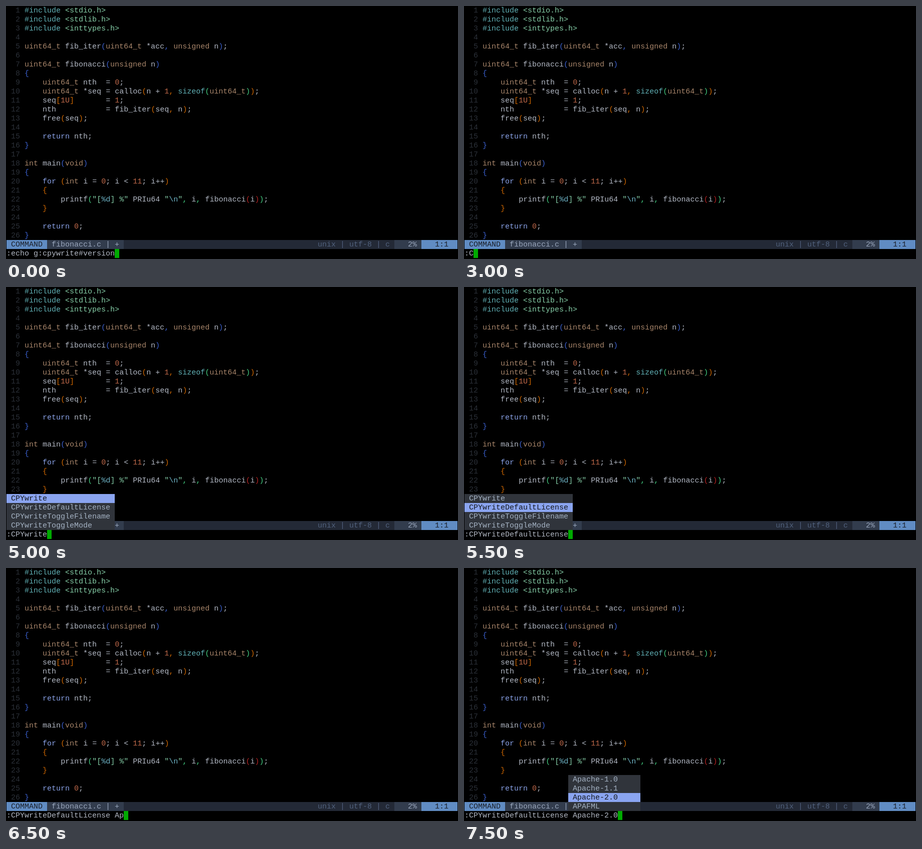
An HTML page that plays this animation: 902x506 px, repeating every 8 s.

```html
<!DOCTYPE html>
<html lang="en">
<head>
<meta charset="utf-8">
<title>Editor session</title>
<style>
  html, body { margin: 0; width: 100%; height: 100%; overflow: hidden; background: #000; }
  #term {
    position: relative; width: 902px; height: 506px; overflow: hidden;
    font: 15px/0 "Liberation Mono", monospace; color: #b3b9c5;
  }
  .cell { position: absolute; height: 18px; white-space: pre; }
  /* pins the text baseline 13px below the top of each cell */
  .cell::before { content: ""; display: inline-block; height: 13px; }
  .num { color: #2b3038; }
  .pre { color: #62b3b8; }
  .str { color: #86cfa8; }
  .esc { color: #6fb5c8; }
  .type { color: #a9866b; }
  .key { color: #8aa2e8; }
  .lit { color: #c0694a; }
  .p0 { color: #3a5fcd; }
  .p1 { color: #cd6600; }
  .p2 { color: #43cd80; }
  .p3 { color: #b22222; }
  .mode { background: #608cc3; color: #1b202a; }
  .info { background: #323c4d; color: #9aa7bd; }
  .bar { background: #232936; color: #51617d; }
  .item { background: #30343b; color: #a5b3c4; }
  .sel { background: #8aa4f0; color: #14171d; }
  .cursor { background: #0a0; color: #000; }
</style>
</head>
<body>
<div id="term"><div id="code"></div><div id="live"></div></div>
<script>
const CELL_W = 9, CELL_H = 18, LOOP = 8000;
const code = document.getElementById('code');
const live = document.getElementById('live');

const source = String.raw`#include <stdio.h>
#include <stdlib.h>
#include <inttypes.h>

uint64_t fib_iter(uint64_t *acc, unsigned n);

uint64_t fibonacci(unsigned n)
{
    uint64_t nth  = 0;
    uint64_t *seq = calloc(n + 1, sizeof(uint64_t));
    seq[1U]       = 1;
    nth           = fib_iter(seq, n);
    free(seq);

    return nth;
}

int main(void)
{
    for (int i = 0; i < 11; i++)
    {
        printf("[%d] %" PRIu64 "\n", i, fibonacci(i));
    }

    return 0;
}`;

function cell(parent, col, row, text, cls, cols = text.length) {
  const el = document.createElement('div');
  el.className = 'cell ' + cls;
  el.style.left = 1 + col * CELL_W + 'px';
  el.style.top = row * CELL_H + 'px';
  el.style.width = cols * CELL_W + 'px';
  el.textContent = text;
  parent.append(el);
  return el;
}

function span(parent, text, cls) {
  const el = document.createElement('span');
  el.className = cls;
  el.textContent = text;
  parent.append(el);
}

let depth = 0;

function tokenClass(tok) {
  if (/^(#\w+|sizeof)$/.test(tok)) return 'pre';
  if (/^<\w/.test(tok)) return 'str';
  if (/^(uint64_t|unsigned|int|void)$/.test(tok)) return 'type';
  if (/^(for|return)$/.test(tok)) return 'key';
  if (/^\d/.test(tok)) return 'lit';
  if (/^[([{]$/.test(tok)) return 'p' + depth++ % 4;
  if (/^[)\]}]$/.test(tok)) return 'p' + --depth % 4;
  if (tok === ',' && depth) return 'p' + (depth - 1) % 4;
  return '';
}

function highlight(el, line) {
  for (const tok of line.match(/^#\w+|<\w+\.h>|"[^"]*"|\w+|\W/g) || []) {
    if (tok.length > 1 && tok[0] === '"') {
      tok.split(/(%d|\\n)/).forEach((part, i) => span(el, part, i % 2 ? 'esc' : 'str'));
    } else {
      span(el, tok, tokenClass(tok));
    }
  }
}

source.split('\n').forEach((line, row) => {
  cell(code, 0, row, String(row + 1).padStart(3), 'num');
  highlight(cell(code, 4, row, '', '', 96), line);
});

const commands = {
  col: 0, cols: 24,
  items: ['CPYwrite', 'CPYwriteDefaultLicense', 'CPYwriteToggleFilename', 'CPYwriteToggleMode']
};
const licenses = {
  col: 23, cols: 16,
  items: ['Apache-1.0', 'Apache-1.1', 'Apache-2.0', 'APAFML']
};
const setLicense = ':CPYwriteDefaultLicense';

const steps = [
  { at: 0, cmd: ':echo g:cpywrite#version' },
  { at: 1500, cmd: '0.3.0', normal: true },
  { at: 3000, cmd: ':C' },
  { at: 3500, cmd: ':CP' },
  { at: 5000, cmd: ':CPYwrite', menu: commands, pick: 0 },
  { at: 5500, cmd: setLicense, menu: commands, pick: 1 },
  { at: 6000, cmd: setLicense + ' ' },
  { at: 6500, cmd: setLicense + ' Ap' },
  { at: 7000, cmd: setLicense + ' Apache-1.0', menu: licenses, pick: 0 },
  { at: 7500, cmd: setLicense + ' Apache-2.0', menu: licenses, pick: 2 }
];

function statusLine(normal) {
  const mode = normal ? ' NORMAL ' : ' COMMAND ';
  cell(live, 0, 26, '', 'bar', 100);
  cell(live, 0, 26, mode, 'mode');
  cell(live, mode.length, 26, ' fibonacci.c | + ', 'info');
  cell(live, 69, 26, 'unix | utf-8 | c', 'bar');
  cell(live, 86, 26, '   2% ', 'info');
  cell(live, 92, 26, '   1:1  ', 'mode');
}

function render({ cmd, normal, menu, pick }) {
  live.replaceChildren();
  statusLine(normal);
  if (menu) {
    menu.items.forEach((name, i) =>
      cell(live, menu.col, 23 + i, ' ' + name, i === pick ? 'sel' : 'item', menu.cols));
  }
  cell(live, 0, 27, cmd, '');
  if (normal) cell(live, 4, 0, '#', 'cursor');
  else cell(live, cmd.length, 27, ' ', 'cursor');
}

let shown;
function tick() {
  const t = performance.now() % LOOP;
  const step = steps.filter(s => s.at <= t).pop();
  if (step !== shown) render(shown = step);
  requestAnimationFrame(tick);
}
tick();
</script>
</body>
</html>
```
